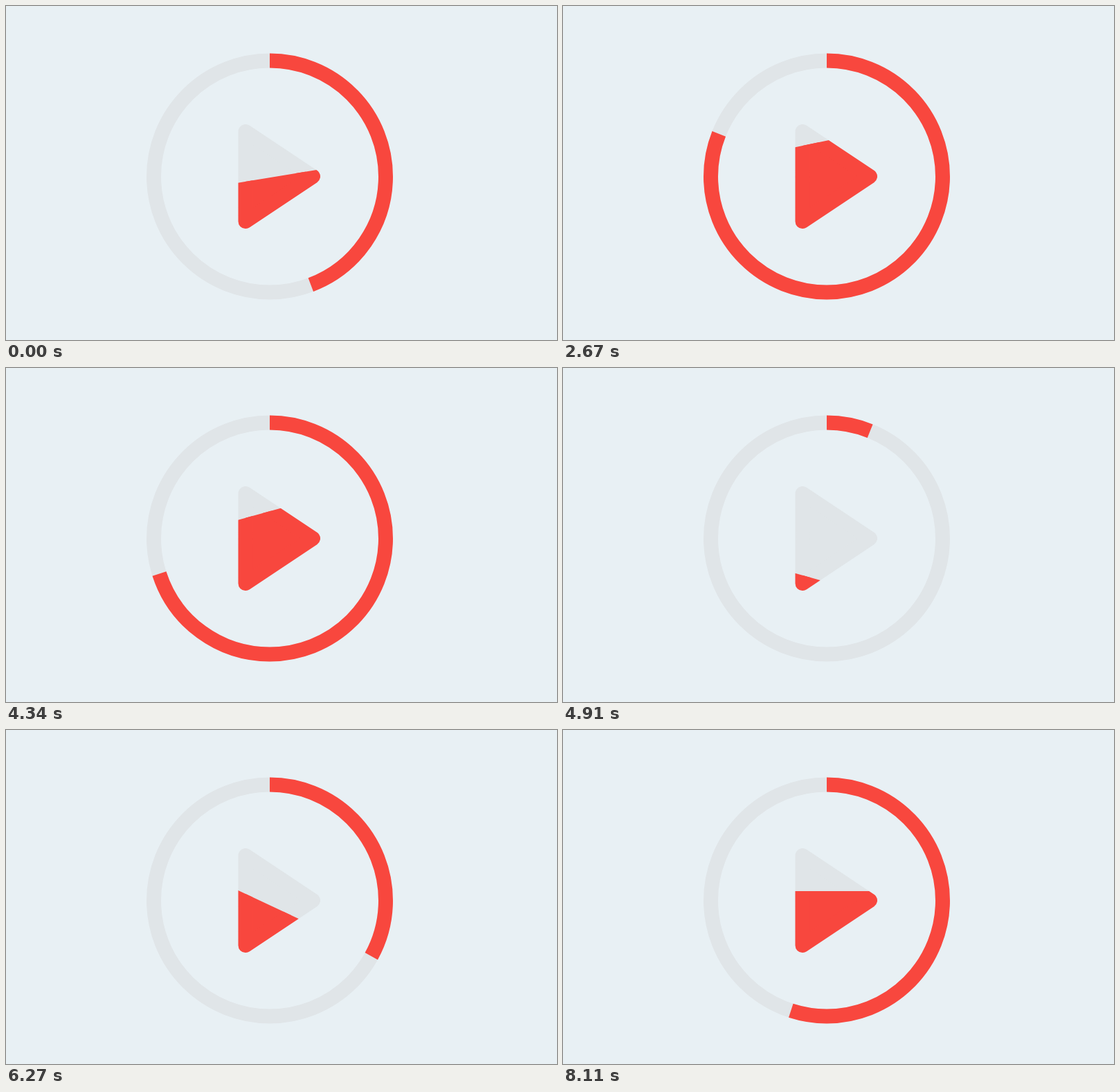
Animation, 796 px wide and 483 px high, one loop 8210 ms. Source, as an HTML page:

```html
<!DOCTYPE html>
<html lang="en">
<head>
<meta charset="utf-8">
<title>Play loader</title>
<style>
  html, body { margin: 0; width: 100%; height: 100%; overflow: hidden; background: #e8f0f4; }
  svg { display: block; width: 796px; height: 483px; }
  .ring, .play { stroke-width: 21; stroke-linejoin: round; }
  .base { stroke: #e0e5e8; fill: #e0e5e8; }
  .live { stroke: #f8473e; fill: #f8473e; }
  .ring { fill: none; }
</style>
</head>
<body>
<svg viewBox="0 0 796 483">
  <defs>
    <clipPath id="level"><polygon id="water"/></clipPath>
  </defs>
  <circle class="ring base" cx="381" cy="246.5" r="167.5"/>
  <circle id="arc" class="ring live" cx="381" cy="246.5" r="167.5" pathLength="1" transform="rotate(-90 381 246.5)"/>
  <path class="play base" d="M346 181.5V311.5L443.5 246.5Z"/>
  <g clip-path="url(#level)">
    <path class="play live" d="M346 181.5V311.5L443.5 246.5Z"/>
  </g>
</svg>
<script>
const LOOP = 8210, TICK = LOOP / 58.7, LEAD = 25;
const CYCLE = 7650, OFFSET = 355, MOVE = 700;

// When each move starts, the share it fills, and the slope it settles at
const stops = [
  { at: 0, share: 0.55, slope: 0 },
  { at: 1605, share: 0.81, slope: -0.21 },
  { at: 3015, share: 0.992, slope: 0 },
  { at: 4430, share: 0.061, slope: 0.28 },
  { at: 5905, share: 0.33, slope: 0.47 }
];

const arc = document.getElementById('arc');
const water = document.getElementById('water');
const mix = (a, b, u) => a + (b - a) * u;
const smooth = u => u * u * (3 - 2 * u);

function draw(time) {
  const t = Math.floor((time % LOOP + LEAD) / TICK) * TICK;
  const phase = (t + OFFSET) % CYCLE;
  const i = stops.filter(s => s.at <= phase).length - 1;
  const to = stops[i], from = stops.at(i - 1);
  const u = Math.min(1, (phase - to.at) / MOVE);
  const share = mix(from.share, to.share, smooth(u));

  // The liquid sloshes while it moves and rests at the stop's slope
  const slosh = Math.sin(Math.PI * u);
  const slope = mix(from.slope, to.slope, smooth(u)) - 0.395 * slosh;
  const y = x => 332 - 180 * share - 11 * slosh + slope * (x - 422);

  arc.setAttribute('stroke-dasharray', `${share} 2`);
  water.setAttribute('points', `320,${y(320)} 470,${y(470)} 470,440 320,440`);
}

const start = performance.now();
function frame() {
  draw(performance.now() - start);
  requestAnimationFrame(frame);
}
frame();
</script>
</body>
</html>
```
